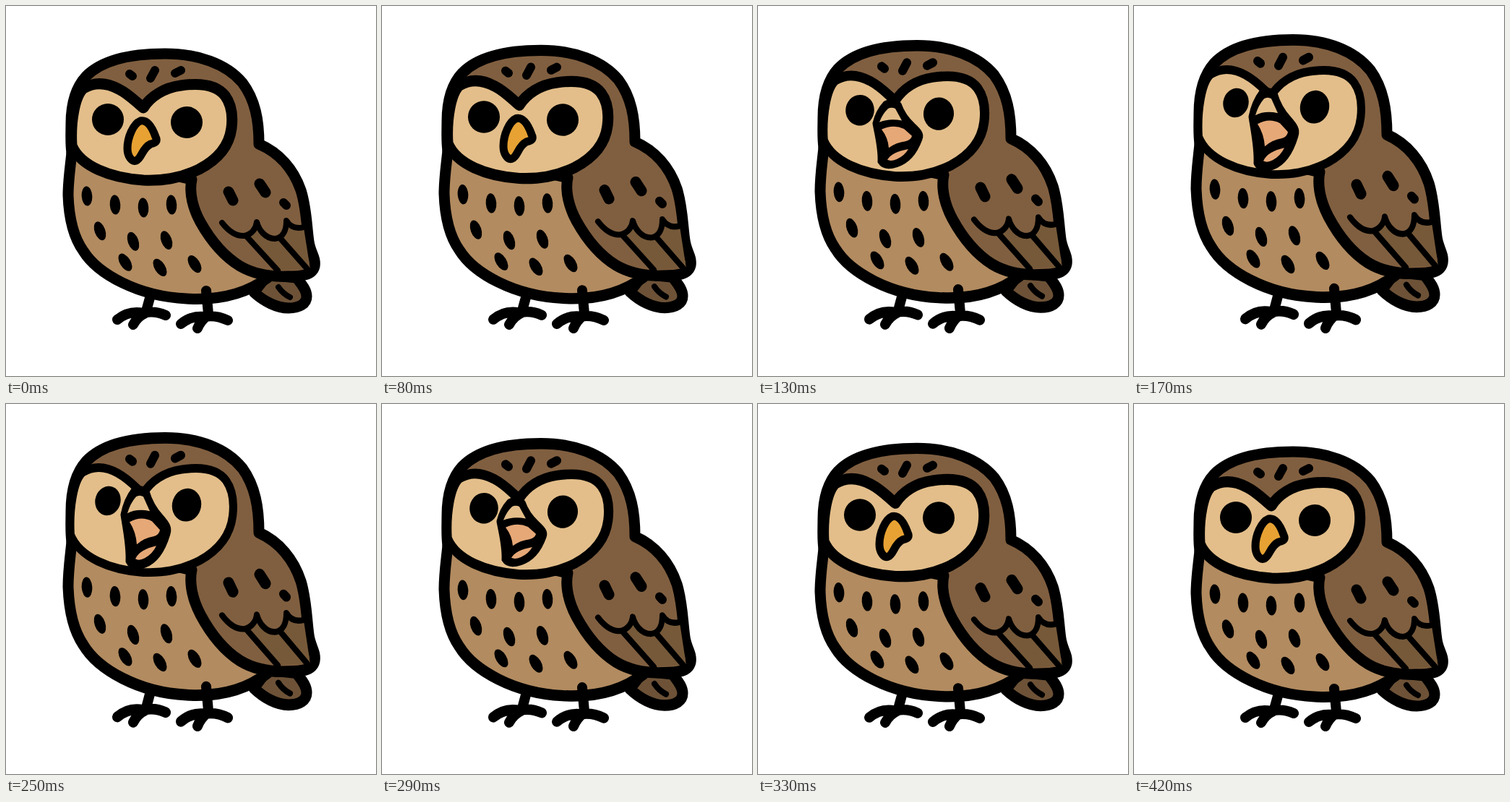
Recreate the animation shown at these times as an HTML page. Size 512 by 512 pixels, loop 0.46 s.

```html
<!DOCTYPE html>
<html lang="en">
<head>
<meta charset="utf-8">
<title>Hooting owl</title>
<style>
  html, body { margin: 0; width: 100%; height: 100%; overflow: hidden; background: #fff; }
  svg { display: block; width: 100%; height: 100%; }
  .line { fill: none; stroke: #000; stroke-width: 15; stroke-linecap: round; stroke-linejoin: round; }
  .brown { fill: #805f40; }
  .feather { fill: #765939; }
  .tail { fill: #6d5237; }
  .belly { fill: #b28b60; }
  .face { fill: #e3be8a; }
  .orange { fill: #e7a233; }
  .mouth { fill: #e6a877; }
  .black { fill: #000; }
  .thin { stroke-width: 8; }
  .beak { stroke-width: 11; }
  .fleck { stroke-width: 12; }
  .foot { stroke-width: 14; }
</style>
</head>
<body>
<svg viewBox="0 0 512 512">
  <g id="owl">
    <path class="line tail" d="M343 396C357 409 375 418 391 418C406 418 416 412 416 402C416 392 408 384 402 376L362 372Z"/>
    <path class="line thin" d="M377 389Q383 398 393 403"/>

    <path class="line belly" d="M91 203C89 223 86 241 86 262C87 292 92 318 107 339C127 371 183 402 250 405C303 408 337 395 362 376L300 220Z"/>

    <path class="line brown" d="M91 203C89 190 90 177 90 163C90 135 97 112 111 97C136 72 179 66 220 66C266 66 305 80 327 106C345 130 350 158 350 191C378 203 398 226 408 255C416 280 416 306 419 326C421 341 429 348 427 360C424 373 408 374 390 374C366 375 343 371 324 360C301 346 283 324 269 299C259 281 253 259 257 240Z"/>

    <path class="feather" d="M334 320L347 302L372 322L388 302L412 307L421 364L376 366Z"/>
    <path class="line thin" d="M299 300C306 309 317 319 330 318C340 316 346 308 347 299C350 310 359 322 372 322C384 321 388 309 388 297C393 305 401 309 412 306M334 320L376 366M380 322L417 364"/>

    <path class="line foot" d="M199 404L194 422M154 434Q170 421 190 425Q205 421 221 428M193 425Q182 430 176 441M277 394L280 426M242 440Q256 428 275 430Q290 427 307 435M279 428Q269 436 265 446"/>

    <path id="mask" class="line face" d="M91 193C89 160 95 125 107 114C122 105 139 106 156 115C170 122 178 131 190 141C200 125 219 113 242 110C270 106 292 110 303 124C312 136 314 153 312 169C309 193 294 212 267 226C240 239 216 242 190 241C145 238 103 222 91 193Z"/>

    <path class="line fleck" d="M171 94L175 97M206 89L200 100M234 93L242 89M384 272L388 276"/>
    <path class="line" d="M308 257L314 269M351 246L359 258"/>
    <g id="spots"></g>
    <ellipse id="eyeL"/>
    <ellipse id="eyeR"/>

    <path id="shut" class="line beak orange" d="M186 159C176 163 168 182 168 197C168 208 174 216 180 214C188 211 188 197 200 191C208 189 210 187 207 181C203 170 196 157 186 159Z"/>

    <g id="open">
      <path class="line beak black" d="M178 121Q184 117 193 122C197 136 204 148 213 158C220 166 225 172 222 180C216 200 207 216 191 222Q176 228 171 218C172 196 167 174 164 154Q168 134 178 121Z"/>
      <path class="face" d="M180 129Q185 126 190 129L199 149Q181 145 168 152Q172 138 180 129Z"/>
      <path class="mouth" d="M171 164Q187 155 202 163L213 175Q212 182 204 184Q191 186 181 195Q180 178 171 164ZM179 215Q185 202 208 197Q203 208 192 214Q184 218 179 215Z"/>
    </g>
  </g>
</svg>
<script>
const HOLDS = [80, 50, 40, 40, 40, 40, 40, 90, 40];
const LOOP = HOLDS.reduce((sum, ms) => sum + ms);
const GROUND = 453, PEAK = 4, MAX_STRETCH = .072;

const $ = id => document.getElementById(id);
const mix = (a, b, k) => a + (b - a) * k;
const setAll = (id, attrs) => {
  for (const name in attrs) $(id).setAttribute(name, attrs[name]);
};
// Scales around a fixed point.
const scaleAt = (x, y, sx, sy) => `translate(${x} ${y}) scale(${sx} ${sy}) translate(${-x} ${-y})`;

// A row of belly spots along a parabola that is lowest at the given position.
function spotRow({ count, x, gap, y, lowest, bend, tilt }) {
  for (let i = 0; i < count; i++) {
    const spotY = y - bend * (i - lowest) ** 2;
    $('spots').innerHTML +=
      `<ellipse rx="7.3" ry="13.5" transform="translate(${x + gap * i} ${spotY}) rotate(${tilt})"/>`;
  }
}
spotRow({ count: 4, x: 112, gap: 39, y: 279, lowest: 2, bend: 4, tilt: -4 });
spotRow({ count: 3, x: 130, gap: 46, y: 327, lowest: 1.4, bend: 8, tilt: -20 });
spotRow({ count: 3, x: 165, gap: 48, y: 362, lowest: 1.1, bend: 6, tilt: -32 });

function poseIndex(t) {
  let i = 0;
  while (t >= HOLDS[i]) t -= HOLDS[i++];
  return i;
}

function draw(now) {
  // Rises pose by pose to the peak, then returns the same way.
  const level = PEAK - Math.abs(poseIndex(now % LOOP) - PEAK);
  const stretch = 1 + MAX_STRETCH * (level / PEAK) ** 1.3;
  const gape = Math.min(1, Math.max(0, (level - 1) / 2));

  setAll('owl', { transform: scaleAt(0, GROUND, 1, stretch) });
  setAll('mask', {
    transform: scaleAt(202, 175, mix(1, 1.015, gape), mix(1, 1.035, gape)),
    style: `stroke-width: ${mix(15, 11, gape)}`
  });
  setAll('eyeL', {
    rx: mix(22, 17.5, gape), ry: mix(22, 19.5, gape),
    transform: `translate(141 ${mix(157, 149, gape)}) rotate(${20 * gape})`
  });
  setAll('eyeR', {
    rx: mix(22, 20, gape), ry: 22,
    transform: `translate(250 ${mix(161, 154.5, gape)}) rotate(${20 * gape})`
  });

  // The open beak hangs from the brow and lengthens as it opens.
  setAll('open', {
    display: gape ? 'inline' : 'none',
    transform: `translate(0 ${mix(152, 135, gape)}) scale(1 ${mix(.65, .954, gape)}) translate(0 -120)`
  });
  setAll('shut', { display: gape ? 'none' : 'inline' });
}

function tick() {
  draw(performance.now());
  requestAnimationFrame(tick);
}
tick();
</script>
</body>
</html>
```
